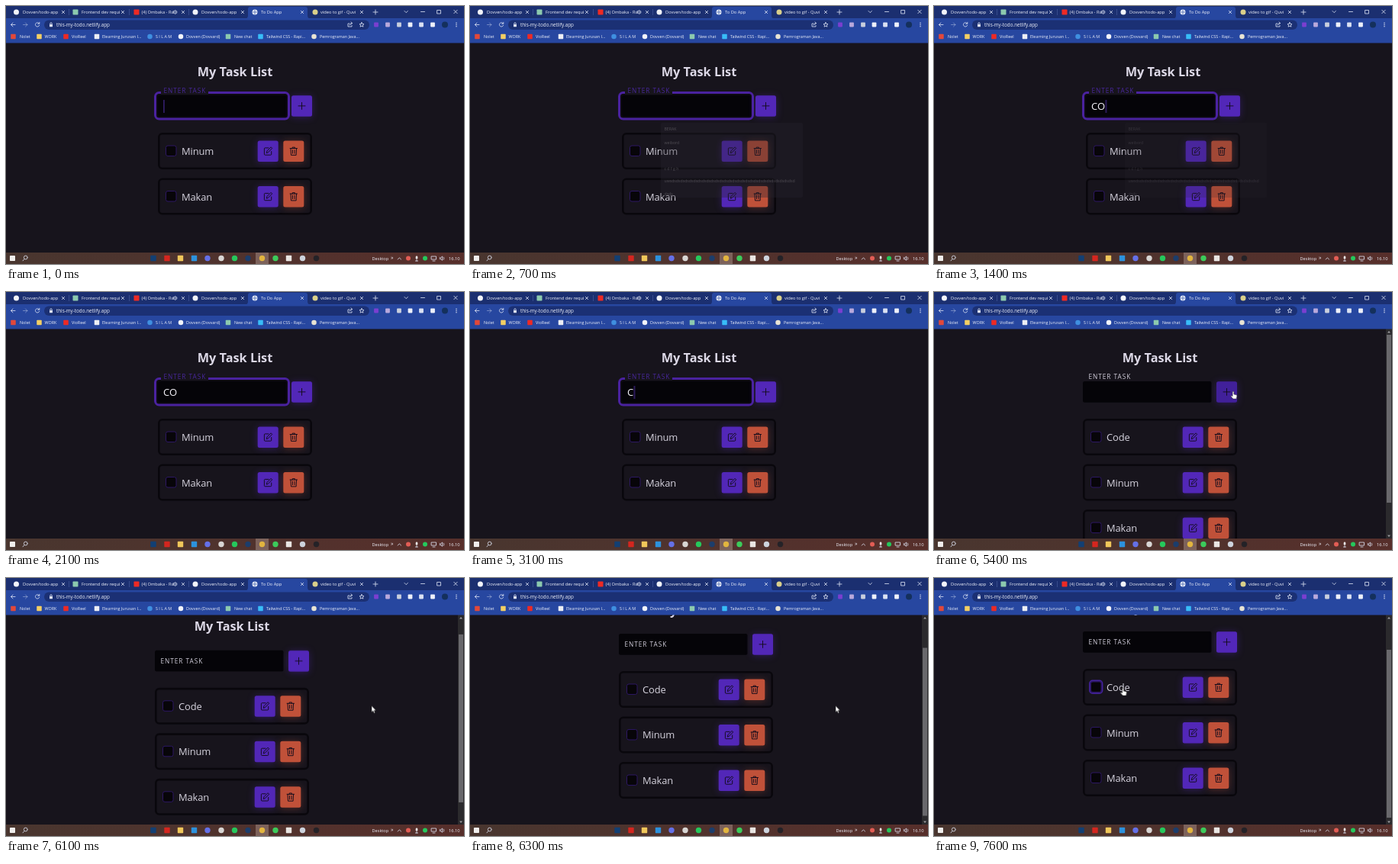
Animation, 600 px wide and 338 px high, one loop 8 s. Source, as an HTML page:

```html
<!DOCTYPE html>
<html lang="en">
<head>
<meta charset="utf-8">
<title>To Do App</title>
<style>
html, body { margin: 0; width: 100%; height: 100%; overflow: hidden; background: #17141c; }
svg { display: block; width: 600px; height: 338px; font-family: "Open Sans", "Noto Sans", sans-serif; }
.anim { animation: 8s step-end infinite; }
.smooth { animation: 8s linear infinite; }

.title { font: 700 16.3px "Open Sans", sans-serif; fill: #dcd8e6; }
.task { font-size: 12.9px; fill: #d6d3de; letter-spacing: -.1px; }
.field { font-size: 13px; fill: #f4f2f8; white-space: pre; }
.label { font-size: 8.3px; letter-spacing: .95px; }
.violet { fill: #5227b8; filter: drop-shadow(0 1px 5px rgba(82, 39, 184, .4)); }
.rust { fill: #c05139; filter: drop-shadow(0 1px 5px rgba(192, 81, 57, .35)); }
.line { fill: none; stroke: #140c1c; stroke-width: .95; stroke-linecap: round; stroke-linejoin: round; }
.ui { fill: none; stroke: #dfe5f5; stroke-width: .8; stroke-linecap: round; stroke-linejoin: round; }

/* adding the task at 5.3 s */
.before { animation-name: before; }
.after { animation-name: after; }
.shift { animation-name: shift; }
.push { animation-name: push; }
@keyframes before { 0% { visibility: visible } 66.25%, to { visibility: hidden } }
@keyframes after { 0% { visibility: hidden } 66.25%, to { visibility: visible } }
@keyframes shift { 0% { transform: none } 66.25%, to { transform: translateX(-4px) } }
@keyframes push { 0% { transform: none } 66.25%, to { transform: translateY(59.5px) } }

.scroll { animation-name: scroll; }
.thumb { animation-name: thumb; }
@keyframes scroll {
  0%, 73.75% { transform: none; animation-timing-function: ease-in-out }
  78.75% { transform: translateY(-44px) }
  80.5%, to { transform: translateY(-47px) }
}
@keyframes thumb {
  0%, 73.75% { transform: none; animation-timing-function: ease-in-out }
  78.75% { transform: translateY(35.5px) }
  80.5%, to { transform: translateY(38px) }
}

.drop { animation-name: drop; }
@keyframes drop { 0%, 67.5% { transform: none } 70%, to { transform: translateY(20.5px) } }
.press { animation-name: press; }
@keyframes press { 0% { fill: #5227b8 } 66.25% { fill: #41209a } 69.5%, to { fill: #5227b8 } }
.ring { animation-name: ring; }
@keyframes ring { 0% { visibility: hidden } 92.5%, to { visibility: visible } }

/* typing */
.k1 { animation-name: k1; }
.k2 { animation-name: k2; }
.k3 { animation-name: k3; }
.k4 { animation-name: k4; }
.k5 { animation-name: k5; }
@keyframes k1 { 0% { visibility: hidden } 15% { visibility: visible } 66.25%, to { visibility: hidden } }
@keyframes k2 { 0% { visibility: hidden } 16.25% { visibility: visible } 28.75%, to { visibility: hidden } }
@keyframes k3 { 0% { visibility: hidden } 41.25% { visibility: visible } 66.25%, to { visibility: hidden } }
@keyframes k4 { 0% { visibility: hidden } 43.75% { visibility: visible } 66.25%, to { visibility: hidden } }
@keyframes k5 { 0% { visibility: hidden } 46.25% { visibility: visible } 66.25%, to { visibility: hidden } }
.caret { animation-name: caret; }
@keyframes caret {
  0% { transform: none; opacity: 1 }
  6.25% { transform: none; opacity: 0 }
  15% { transform: translateX(8.5px); opacity: 1 }
  16.25% { transform: translateX(18.5px); opacity: 1 }
  23.75% { transform: translateX(18.5px); opacity: 0 }
  28.75% { transform: translateX(8.5px); opacity: 1 }
  35% { transform: translateX(8.5px); opacity: 0 }
  38.75% { transform: translateX(8.5px); opacity: 1 }
  41.25% { transform: translateX(16.5px); opacity: 1 }
  43.75% { transform: translateX(24.5px); opacity: 1 }
  46.25% { transform: translateX(32px); opacity: 1 }
  52.5% { transform: translateX(32px); opacity: 0 }
  58.75% { transform: translateX(32px); opacity: 1 }
  62.5%, to { transform: translateX(32px); opacity: 0 }
}

.hints { animation-name: hints; }
@keyframes hints {
  0%, 5% { opacity: 0 }
  8.75%, 14% { opacity: .35 }
  17.5% { opacity: .2 }
  25%, to { opacity: 0 }
}

/* pointer */
.mouse { animation-name: mouse; }
@keyframes mouse {
  0%, 48.75% { transform: translate(566px, 323px) }
  50.5% { transform: translate(505px, 250px) }
  53.75%, 65% { transform: translate(386.5px, 129px) }
  66.25%, 68.5% { transform: translate(392px, 130px); animation-timing-function: ease-in-out }
  74%, 82.5% { transform: translate(479px, 167.5px) }
  87.5% { transform: translate(404px, 170px) }
  92.5% { transform: translate(251px, 147px) }
  94%, to { transform: translate(247.5px, 144px) }
}
.arrow { animation-name: arrow; }
.hand { animation-name: hand; }
@keyframes arrow {
  0% { visibility: hidden } 48.75% { visibility: visible } 53% { visibility: hidden }
  69.75% { visibility: visible } 92.5%, to { visibility: hidden }
}
@keyframes hand {
  0% { visibility: hidden } 53% { visibility: visible }
  69.75% { visibility: hidden } 92.5%, to { visibility: visible }
}
</style>
</head>
<body>
<svg id="stage" viewBox="0 0 600 338" xmlns="http://www.w3.org/2000/svg"></svg>
<script>
const rect = (x, y, w, h, fill, r = 0, extra = '') =>
  `<rect x="${x}" y="${y}" width="${w}" height="${h}" rx="${r}" fill="${fill}" ${extra}/>`;
const dot = (x, y, r, fill) => `<circle cx="${x}" cy="${y}" r="${r}" fill="${fill}"/>`;
const box = (x, y, s, fill) => rect(x - s / 2, y - s / 2, s, s, fill, .8);
const text = (x, y, s, size, fill = '#eef1fa') =>
  `<text x="${x}" y="${y}" font-size="${size}" fill="${fill}">${s}</text>`;
const path = (d, cls = 'ui', extra = '') => `<path d="${d}" class="${cls}" ${extra}/>`;
const cross = (x, y, r) => path(`M${x - r} ${y - r}l${2 * r} ${2 * r}M${x + r} ${y - r}l${-2 * r} ${2 * r}`);
const mark = (round, x, y, s, fill) => round ? dot(x, y, s / 2, fill) : box(x, y, s, fill);

// round icon?, icon x, colour, text x, text, close x
const tabs = [
  [1, 13.5, '#f2f4fa', 22, 'Dovven/todo-app', 75],
  [0, 91, '#8cc9ae', 99, 'Frontend dev requi', 153],
  [0, 171, '#ee2a24', 177.5, '(4) Ombaka - Ru', 232],
  [1, 248, '#f2f4fa', 256, 'Dovven/todo-app', 310],
  [1, 326, '#e6ebf7', 334, 'To Do App', 388],
  [1, 405, '#d9cf8a', 412, 'video to gif - Quvi', 466]
];
const bookmarks = [
  [0, 9.5, '#e2483a', 18, 'Nolet'],
  [0, 43.5, '#f3cf63', 50.5, 'WORK'],
  [0, 78.5, '#ee2a24', 86, 'VioReel'],
  [0, 119, '#eceef4', 126, 'Elearning Jurusan I...'],
  [1, 188.5, '#3f8fe0', 196, 'S I L A M'],
  [1, 229, '#f2f4fa', 236, 'Dovven (Dovvard)'],
  [0, 291, '#8cc9ae', 299, 'New chat'],
  [0, 333.5, '#38bdf8', 341, 'Tailwind CSS - Rapi...'],
  [1, 403.5, '#e8e4d4', 411, 'Pemrograman Java...']
];
const extensions = [
  [0, 485, '#7a3fd0'], [0, 500, '#b9a9dc'], [0, 515, '#c9cfdd'],
  [0, 529.5, '#eef1fa'], [0, 544, '#dbe2f3'], [0, 559, '#eef1fa'], [1, 575, '#14305c']
];
const apps = [
  [0, 193, '#123f73'], [0, 211, '#d4261f'], [0, 228.5, '#f0c75a'], [0, 246.5, '#2c92dd'],
  [1, 264, '#6470e8'], [1, 282, '#d8d6d4'], [1, 299.5, '#25c85c'], [1, 317, '#1c3d6b'],
  [1, 335.5, '#e2b53f'], [1, 353, '#3ccb5b'], [0, 370.5, '#e9e5e2'], [1, 388.5, '#cdd3dd'],
  [1, 406.5, '#242227']
];

function browser() {
  let s = rect(0, 0, 600, 17, '#1b2f70') + rect(0, 16, 600, 32.5, '#2747a0');
  s += path('M313 16.5q4 0 4-4V4q0-3 3-3h72q3 0 3 3v8.500q0 4 4 4z', '', 'fill="#2747a0"');
  for (const [round, x, fill, tx, name, close] of tabs)
    s += mark(round, x, 8, 7, fill) + text(tx, 10.2, name, 5.7) + cross(close, 8, 1.7);
  s += path('M323 8h6M326 5v6', '', 'stroke="#3a5aa8" stroke-width=".7"');
  for (const x of [82, 161, 239]) s += rect(x, 4, .6, 8, '#4c61a0');
  s += path('M219 7v2h1.300l1.700 1.500v-5L220.300 7zM223.500 6.500q1.200 1.500 0 3');
  s += path('M481 8h6M484 5v6M522 6.500l2.200 2.200 2.200-2.200M543.500 7.500h5M565 5.500h4.500V10H565z') + cross(589, 7.500, 2.2);

  s += rect(50, 18.5, 426, 12.5, '#1b3074', 6.2);
  s += path('M12 24.500H6.500m2.500-2.500l-2.500 2.500 2.500 2.500');
  s += path('M22.500 24.500H28m-2.500-2.500l2.500 2.500-2.500 2.500', 'ui', 'opacity=".5"');
  s += path('M43.500 23a2.700 2.700 0 1 0 .2 2.400M43.800 21.300V23.300h-2');
  s += rect(57, 24, 4, 3.2, '#dfe5f5', .5) + path('M57.800 24v-1a1.200 1.200 0 0 1 2.400 0v1');
  s += text(66, 26.8, 'this-my-todo.netlify.app', 6.3);
  s += path('M450 23h-2v4h5v-1.500M450 25q.5-2.500 3.500-2.500m-1.500-1.500l1.700 1.500-1.700 1.500');
  s += path('M466 21.500l.9 2 2.100.2-1.600 1.400.5 2.100-1.900-1.100-1.900 1.100.5-2.100-1.600-1.400 2.100-.2z');
  for (const [round, x, fill] of extensions) s += mark(round, x, 24.5, round ? 8 : 5.8, fill);
  for (const y of [22.3, 24.5, 26.7]) s += dot(590, y, .7, '#eef1fa');

  for (const [round, x, fill, tx, name] of bookmarks)
    s += mark(round, x, 40, 6.5, fill) + text(tx, 42, name, 5.4);
  return s;
}

function taskbar() {
  let s = '<linearGradient id="bar"><stop stop-color="#49362f"/><stop offset="1" stop-color="#572f2b"/></linearGradient>';
  s += rect(0, 323, 600, 15, 'url(#bar)') + box(8.5, 330.5, 7, '#f0eeec');
  s += path('M27.200 329a2.400 2.400 0 1 0-4.800 0 2.400 2.400 0 0 0 4.800 0M23 331l-2 2.300', 'ui', 'transform="translate(1 .5)"');
  s += rect(327, 323, 17, 15, '#7d625b');
  for (const [round, x, fill] of apps) s += mark(round, x, 330.5, 7.4, fill);
  s += text(479.5, 333, 'Desktop', 5.6) + text(504, 331.5, '»', 7);
  s += path('M513.200 332l2.200-2.200 2.200 2.200');
  s += dot(527, 330.5, 3, '#e25d55') + rect(536.7, 327.5, 2.6, 4, '#eee', 1.3) + path('M538 332v2m-1.500 0h3');
  s += dot(549, 330.5, 3, '#25c85c') + path('M557.500 328h6v4h-6zM559 334h3');
  s += path('M568.500 329.700v2h1.300l1.700 1.500v-5.200l-1.700 1.700zM573.300 329q1.200 1.700 0 3.300');
  return s + text(580, 333, '16.10', 5.7);
}

const button = (x, y, cls, icon, extra = '') =>
  rect(x, y, 27, 27.5, '', 2.5, `class="${cls}" ${extra}`) +
  path(icon, 'line', `transform="translate(${x + 13.5} ${y + 13.7})"`);

const PLUS = 'M-4.500 0h9M0-4.500v9';
const PEN = 'M.8-4.300H-3.800a1 1 0 0 0-1 1v7.300a1 1 0 0 0 1 1h7.300a1 1 0 0 0 1-1V.3M-1.800 2l.6-2.300L3.900-5.400l1.600 1.600L.4 1.400z';
const BIN = 'M-4.700-3.700h9.400M-1.600-3.700v-1.400h3.200v1.400M-3.800-3.700l.5 8.900h6.600l.5-8.900M-1.300-1.500v4.500M1.300-1.500v4.500';

const row = (y, name, glow = '') =>
  rect(200.3, y + 1.3, 199.4, 45.4, '#17141c', 4.5, 'stroke="#09070c" stroke-width="2.6"') + glow +
  rect(209.5, y + 17, 13.5, 13.5, '#070509', 2.5, 'stroke="#2c1763" stroke-width="1"') +
  `<text class="task" x="230" y="${y + 29}">${name}</text>` +
  button(329.7, y + 10.5, 'violet', PEN) + button(363.3, y + 10.5, 'rust', BIN);

function form() {
  const ring = rect(195.5, 113.5, 175, 34.5, '#0d0a12', 5, 'stroke="#4a229f" stroke-width="3"') +
    rect(203, 110, 62, 6, '#17141c');
  return `<text class="title" x="300" y="91.7" text-anchor="middle">My Task List</text>
    <g class="anim before">${ring}</g>
    ${rect(199, 117, 168.5, 27.8, '#050408', 2.5)}
    <text class="label anim before" x="206.5" y="113.500" fill="#47279a">ENTER TASK</text>
    <g class="smooth drop"><text class="label anim after" x="206.5" y="113.500" fill="#d0ccd9">ENTER TASK</text></g>
    <text class="field" x="206" y="136"><tspan class="anim k1">C</tspan><tspan class="anim k3">o</tspan><tspan class="anim k4">d</tspan><tspan class="anim k5">e</tspan></text>
    <text class="field" x="206" y="136"><tspan fill="none">C</tspan><tspan class="anim k2">O</tspan></text>
    ${rect(206.5, 123, .9, 17, '#5b35bd', 0, 'class="anim caret"')}
    ${button(374, 117.2, 'violet anim press', PLUS)}`;
}

function page() {
  const glow = rect(207.7, 181.2, 17, 17, '#2a1462', 4,
    'stroke="#44239c" stroke-width="1.4" class="anim ring"');
  return `<clipPath id="view"><path d="M0 48.500h600V323H0z"/></clipPath>
  <g clip-path="url(#view)">
    <g class="anim shift"><g class="smooth scroll">
      ${form()}
      <g class="anim after">${row(166, 'Code', glow)}</g>
      <g class="anim push">${row(166, 'Minum')}${row(225.5, 'Makan')}</g>
    </g></g>
    <g class="anim after">
      ${rect(592, 48, 8, 275, '#2b2a2d')}
      ${path('M594 53.500l2-2.500 2 2.500zM594 318.500l2 2.500 2-2.500z', '', 'fill="#a09fa3"')}
      ${rect(593, 56, 6, 220, '#69686c', 0, 'class="smooth thumb"')}
    </g>
  </g>`;
}

function hints() {
  const names = [[161, 'BERAK'], [179, 'weibord'], [213, 'c d f g h'], [229, 'uw' + 'sd'.repeat(29)], [246, 'dsds']];
  return `<g class="smooth hints">${rect(250, 153, 186, 98, '#28252e', 2)}
    ${names.map(([y, s]) => text(254.5, y + 2, s, 5.2, '#b5b2bb')).join('')}</g>`;
}

const pointer = `<g class="smooth mouse">
  <path class="anim arrow" d="M0 0v8.200l1.900-1.700 1.300 2.900 1.300-.6-1.300-2.800h2.500z" fill="#fff" stroke="#222" stroke-width=".5"/>
  <path class="anim hand" d="M-.9 1q.9-1.800 1.800 0v3l3.200.8q1 .4.8 1.500L4.200 10H-.2L-3 6.800q0-1.400 1.300-.8l.8.700z" fill="#fff" stroke="#222" stroke-width=".5"/>
</g>`;

document.getElementById('stage').innerHTML =
  rect(0, 0, 600, 338, '#17141c') + page() + hints() + browser() + taskbar() + pointer;
</script>
</body>
</html>
```
